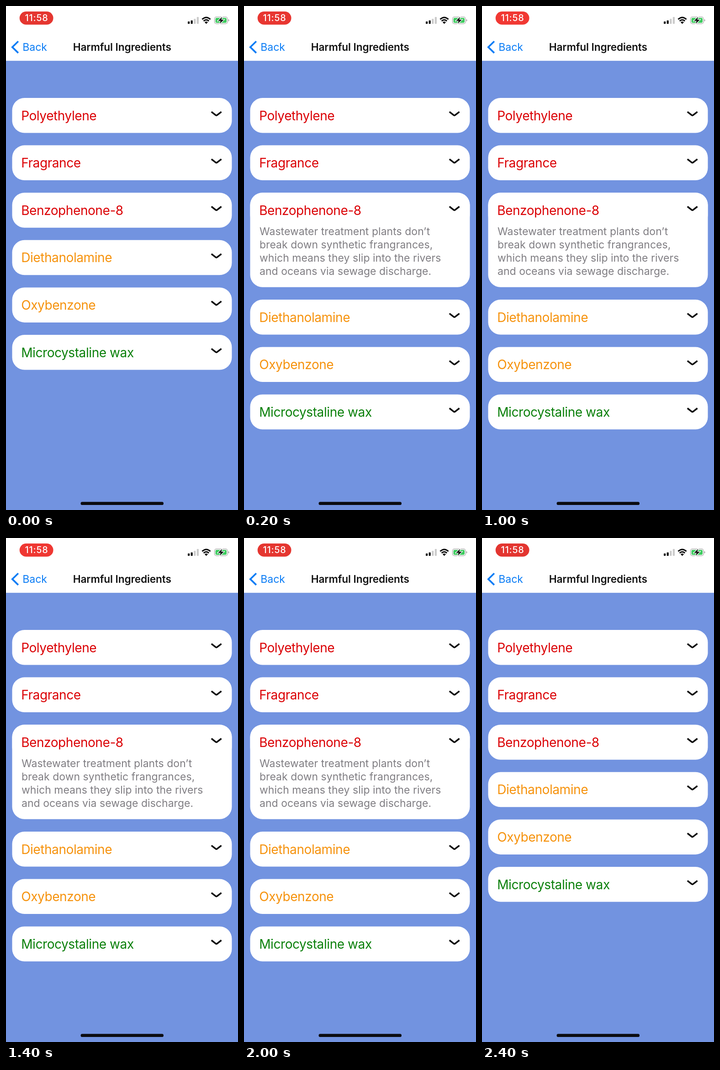
Write an HTML page that moves like this. It is 508 px wide and 1102 px high and loops after 2.5 s.

```html
<!DOCTYPE html>
<html lang="en">
<head>
<meta charset="utf-8">
<title>Harmful Ingredients</title>
<style>
  html, body { margin: 0; width: 100%; height: 100%; overflow: hidden; background: #7293e0; }
  svg { display: block; width: 100%; height: 100%; font-family: Inter, Roboto, sans-serif; }
  .name { font-size: 28px; letter-spacing: -0.015em; }
  .note { font-size: 22.9px; letter-spacing: 0.0035em; fill: #7f7d82; }
  .bad { fill: #db0004; }
  .warn { fill: #f6920c; }
  .ok { fill: #0b800b; }
  .arrow { fill: none; stroke: #0c0c0c; stroke-width: 3.5; stroke-linejoin: round; }

  .pill { animation: pulse 2.5s linear infinite; }
  .opened { visibility: hidden; animation: show 2.5s step-end infinite; }
  .lower { animation: push 2.5s step-end infinite; }

  @keyframes pulse {
    0%, 80% { fill: #e53630; }
    24%, 56% { fill: #ef3732; }
    40% { fill: #f13833; }
    90% { fill: #e1342f; }
    100% { fill: #e53630; }
  }
  /* the card is open from 0.2 s to 2.1 s */
  @keyframes show {
    0% { visibility: hidden; }
    7.9% { visibility: visible; }
    83.9%, 100% { visibility: hidden; }
  }
  @keyframes push {
    0% { transform: translateY(0); }
    7.9% { transform: translateY(130.2px); }
    83.9%, 100% { transform: translateY(0); }
  }
</style>
</head>
<body>
<svg viewBox="0 0 508 1102" preserveAspectRatio="none">
  <defs>
    <g id="card">
      <rect x="13.5" width="481" height="76.5" rx="27" fill="#fff"/>
      <path class="arrow" d="M449.8 30.3L459.2 37.6Q460.7 38.8 462.2 37.6L471.6 30.3"/>
    </g>
  </defs>

  <rect width="508" height="1102" fill="#7293e0"/>
  <rect width="508" height="119.8" fill="#fff"/>

  <!-- status bar -->
  <rect class="pill" x="29.7" y="12" width="73.8" height="28.8" rx="14.4"/>
  <text x="67" y="33.4" font-size="19.8" font-weight="500" letter-spacing=".8" fill="#fff" text-anchor="middle">11:58</text>
  <g fill="#0c0c0c">
    <rect x="398" y="33.8" width="4.2" height="5.2" rx="1"/>
    <rect x="404.6" y="31.4" width="4.2" height="7.6" rx="1"/>
    <g fill="#cbcbcb">
      <rect x="411.2" y="28" width="4.2" height="11" rx="1"/>
      <rect x="417.8" y="24" width="4.2" height="15" rx="1"/>
    </g>
    <path d="M438.5 39.2L434.9 35.5Q438.5 32.6 442.1 35.5Z"/>
  </g>
  <g fill="none" stroke="#0c0c0c" stroke-width="3">
    <path d="M429.4 29.2Q438.5 20.8 447.6 29.2"/>
    <path d="M432.7 32.9Q438.5 27.7 444.3 32.9"/>
  </g>
  <rect x="456.5" y="23.8" width="28.6" height="15" rx="4.4" fill="#fff" stroke="#a9a9a9" stroke-width="1.3"/>
  <rect x="458.6" y="25.9" width="24.4" height="10.8" rx="2.6" fill="#3ccb5e"/>
  <path d="M486.6 28.8Q488.8 29.5 488.8 31.3T486.6 33.8Z" fill="#a9a9a9"/>
  <path d="M473.2 23.8L464.2 32.4H469.7L468 38.8L477 30H471.5Z" fill="#0c0c0c" stroke="#fff" stroke-width="2.4" paint-order="stroke"/>

  <!-- navigation -->
  <path d="M26.8 77.2L13.8 89.9L26.8 102.6" fill="none" stroke="#0a7cf5" stroke-width="3.7"/>
  <text x="36.2" y="98.2" font-size="23" fill="#0a7cf5">Back</text>
  <text x="254.3" y="98" font-size="22.6" font-weight="600" letter-spacing="-.1" fill="#111" text-anchor="middle">Harmful Ingredients</text>

  <!-- list -->
  <use href="#card" y="201"/>
  <text class="name bad" x="33.2" y="249.6">Polyethylene</text>
  <use href="#card" y="304.6"/>
  <text class="name bad" x="33.2" y="353.2">Fragrance</text>

  <rect class="opened" x="13.5" y="408.2" width="481" height="206.5" rx="27" fill="#fff"/>
  <use href="#card" y="408.2"/>
  <text class="name bad" x="33.2" y="456.8">Benzophenone-8</text>
  <g class="opened note">
    <text x="34" y="501">Wastewater treatment plants don’t</text>
    <text x="34" y="530">break down synthetic frangrances,</text>
    <text x="34" y="559.2">which means they slip into the rivers</text>
    <text x="34" y="588.3">and oceans via sewage discharge.</text>
  </g>

  <g class="lower">
    <use href="#card" y="511.8"/>
    <text class="name warn" x="33.2" y="560.4">Diethanolamine</text>
    <use href="#card" y="615.4"/>
    <text class="name warn" x="33.2" y="664">Oxybenzone</text>
    <use href="#card" y="719"/>
    <text class="name ok" x="33.2" y="767.6">Microcystaline wax</text>
  </g>

  <rect x="163.5" y="1084.3" width="181.5" height="6.8" rx="3.4" fill="#0c0c10"/>
</svg>
</body>
</html>
```
